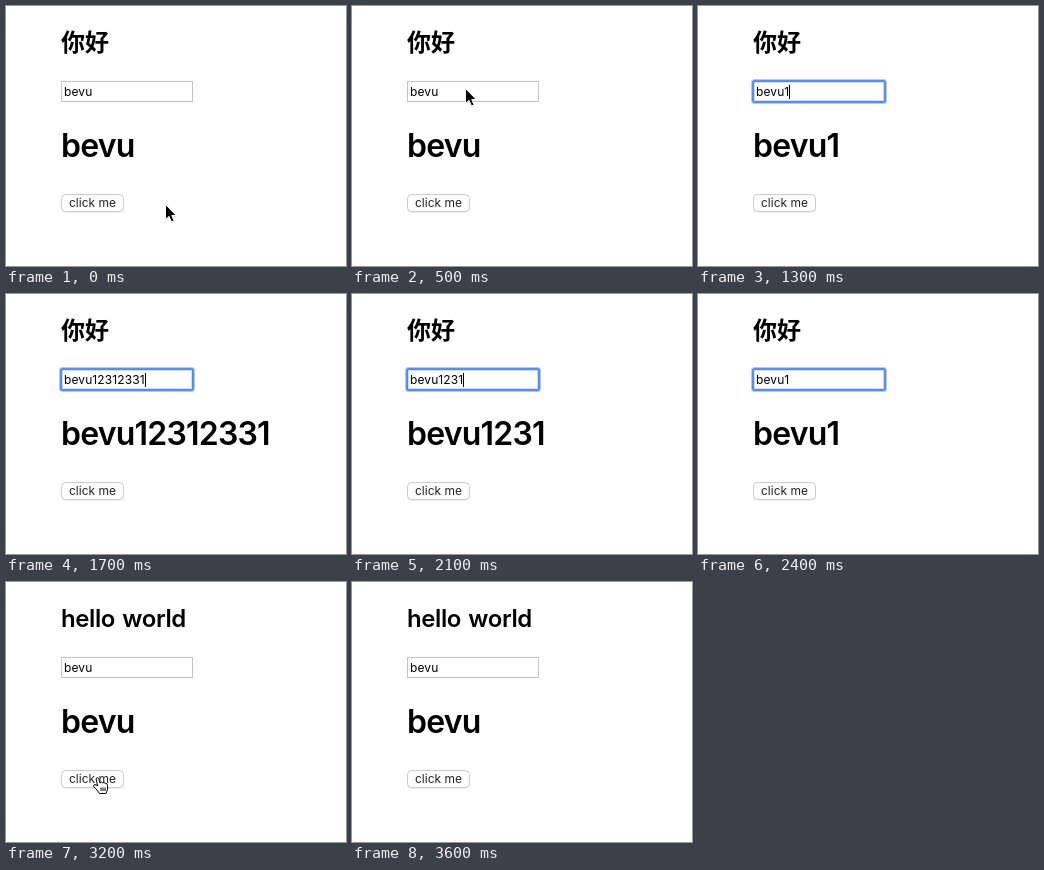
Animation, 340 px wide and 260 px high, one loop 3700 ms. Source, as an HTML page:

```html
<!DOCTYPE html>
<html lang="en">
<head>
<meta charset="utf-8">
<style>
  html, body { margin: 0; width: 100%; height: 100%; overflow: hidden; background: #fff; }
  svg { display: block; width: 340px; height: 260px; }
  text { font-family: Inter, "Noto Sans CJK SC", "Noto Sans CJK", "Noto Sans CJK JP", sans-serif; font-size: 12px; white-space: pre; }
  #field { letter-spacing: .1px; }
  .title { font-size: 24px; font-weight: 600; letter-spacing: -.4px; word-spacing: 1.6px; }
  .title.cjk { font-weight: 700; letter-spacing: 0; }
  .echo { font-size: 32px; font-weight: 600; letter-spacing: -.78px; }
</style>
</head>
<body>
<svg viewBox="0 0 340 260">
  <text id="title" class="title" x="55" y="45"></text>

  <rect id="box" x="55.5" y="75.5" width="131" height="20" fill="#fff" stroke="#c4c4c4"/>
  <g id="ring" fill="none" stroke="#3b7cf5">
    <rect x="53.5" y="73.5" width="135" height="24" rx="2.5" opacity=".4"/>
    <rect x="54.5" y="74.5" width="133" height="22" rx="1.5" opacity=".85"/>
    <rect x="55.5" y="75.5" width="131" height="20" opacity=".8"/>
    <rect x="56.5" y="76.5" width="129" height="18" opacity=".25"/>
  </g>
  <rect id="pick" x="58" y="78" width="28" height="15" fill="#b3d7fe"/>
  <text id="field" x="58" y="90"></text>
  <rect id="caret" y="79" width="1" height="14"/>

  <text id="echo" class="echo" x="55" y="151"></text>

  <rect x="55.5" y="189" width="62" height="17" rx="4" fill="none" stroke="#ddd"/>
  <rect x="55.5" y="188.5" width="62" height="17" rx="4" fill="#fff" stroke="#ccc"/>
  <text x="63" y="201" fill="#222">click me</text>

  <g id="arrow" stroke-linejoin="round">
    <path d="M0 1V16L3.5 13 6 18.5 8.8 17.3 6.4 12H11Z" fill="#000" opacity=".2"/>
    <path d="M0 0V15L3.5 11.8 6 17.5 8.6 16.3 6.2 11H10.7Z" stroke="#fff"/>
  </g>
  <path id="beam" d="M-4 -7.5H-2Q0 -7.5 0 -5.5Q0 -7.5 2 -7.5H4M0 -6V6M-4 7.5H-2Q0 7.5 0 5.5Q0 7.5 2 7.5H4M-2 3.5H2" fill="none" stroke="#000"/>
  <path id="hand" d="M0 1Q1.2 -.8 2.6 1L4 5.5Q5.5 4 6.7 5.3Q8.2 4.4 9.2 5.8Q11.2 5.3 11.5 8V12L10 16H3.5L1 12.5 -2.5 8.8Q-2.5 6.3 0 7.3L1.7 8.5Z M5 10V13.5M7 10V13.5M9 10V13.5" fill="#fff" stroke="#000" stroke-linejoin="round"/>
</svg>
<script>
const LOOP = 3700, WORD = "bevu12312331";
const $ = id => document.getElementById(id);
const show = (id, on) => $(id).style.display = on ? "" : "none";

// [start ms, length of the typed text]
const typing = [[0, 4], [1300, 5], [1400, 7], [1500, 8], [1600, 10], [1700, 12],
  [1900, 11], [2000, 9], [2100, 8], [2200, 6], [2400, 5], [2600, 4]];

// [start ms, shape, x, y]
const pointer = [[0, "arrow", 159.5, 198.5], [100, "arrow", 128, 140], [200, "arrow", 78, 52],
  [300, "arrow", 60.5, 30.5], [400, "arrow", 92, 58], [500, "arrow", 113.5, 82.5],
  [700, "beam", 115.5, 85.5], [1300, ""],
  [2700, "beam", 115.5, 88.5], [2800, "arrow", 112, 112], [2900, "beam", 102.5, 148.5],
  [3000, "hand", 92, 197], [3100, "hand", 90, 195.5],
  [3300, "arrow", 126, 214], [3400, "arrow", 165, 232], [3500, "arrow", 208, 249], [3600, ""]];

const at = (list, t) => list.findLast(k => k[0] <= t);
const within = (t, a, b) => t >= a && t < b;

function draw(t) {
  const clicked = t >= 3100, focus = within(t, 700, 3100), picked = within(t, 900, 1100);
  $("title").textContent = clicked ? "hello world" : "你好";
  $("title").classList.toggle("cjk", !clicked);
  $("field").textContent = $("echo").textContent = WORD.slice(0, at(typing, t)[1]);

  show("ring", focus);
  show("pick", picked);
  show("caret", focus && !picked && !within(t, 2400, 2600));
  $("caret").setAttribute("x", Math.round(58 + $("field").getComputedTextLength()));

  const [, shape, x, y] = at(pointer, t);
  for (const id of ["arrow", "beam", "hand"]) show(id, id === shape);
  if (shape) $(shape).setAttribute("transform", `translate(${x} ${y})`);
}

const start = performance.now();
function tick() {
  draw((performance.now() - start) % LOOP);
  requestAnimationFrame(tick);
}
tick();
</script>
</body>
</html>
```
